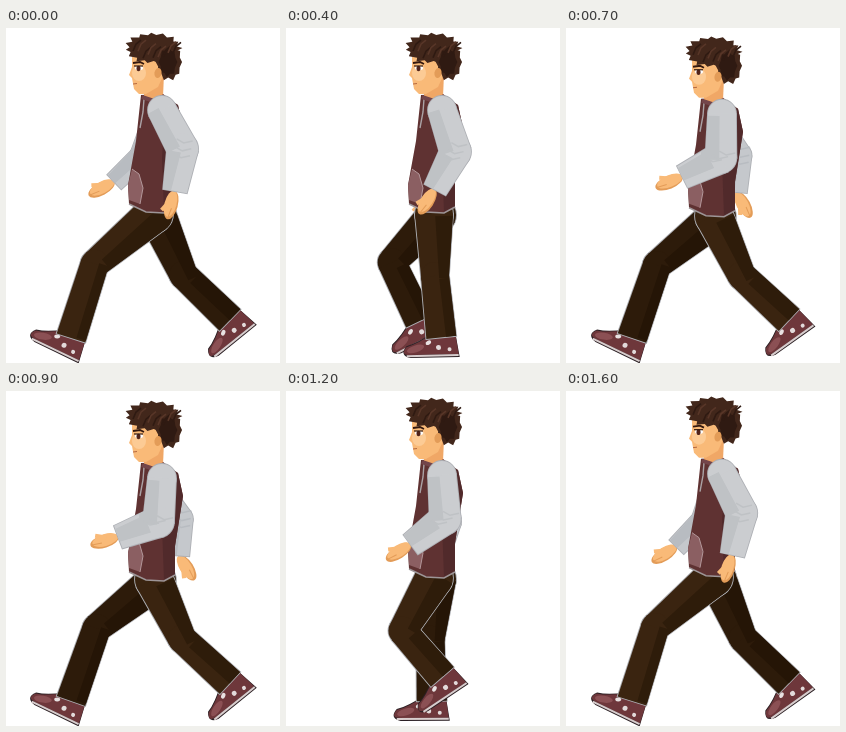
An HTML page with a canvas that plays this animation: 274x335 px, repeating every 1.7 s.

```html
<!DOCTYPE html>
<html lang="en">
<head>
<meta charset="utf-8">
<title>Walk cycle</title>
<style>
html, body { margin: 0; width: 100%; height: 100%; overflow: hidden; background: #fff; }
canvas { display: block; }
</style>
</head>
<body>
<canvas id="stage" width="274" height="335"></canvas>
<script>
const ctx = document.getElementById('stage').getContext('2d');
const LOOP = 1700, STEPS = 16, HALF = 8, GROUND = 310;
const EDGE = '#aeb0b5', SKIN = '#f9ba78', SKIN_DARK = '#e39c58', VEST = '#5f3232', VEST_DARK = '#512a2b';
const { sin, cos, PI, max, hypot } = Math;
const mix = (a, b, p) => a + (b - a) * p;

// --- drawing helpers ---
function random(seed) {
  return () => (seed = seed * 16807 % 2147483647) / 2147483647;
}
function trace(pts) {
  ctx.beginPath();
  pts.forEach(p => ctx.lineTo(...p));
}
function fill(color, ...pts) {
  trace(pts);
  ctx.fillStyle = color;
  ctx.fill();
}
function line(color, width, ...pts) {
  trace(pts);
  ctx.strokeStyle = color;
  ctx.lineWidth = width;
  ctx.stroke();
}
function oval(color, x, y, rx, ry, turn = 0) {
  ctx.beginPath();
  ctx.ellipse(x, y, rx, ry, turn, 0, 2 * PI);
  ctx.fillStyle = color;
  ctx.fill();
}
function at(x, y, angle, part) {
  ctx.save();
  ctx.translate(x, y);
  ctx.rotate(angle);
  part();
  ctx.restore();
}
// Oval with an uneven, spiky rim
function tuft(color, x, y, rx, ry, spikes, seed) {
  const rnd = random(seed), pts = [];
  for (let i = 0; i < spikes * 2; i++) {
    const a = i * PI / spikes + rnd() * .12, r = i % 2 ? .87 : 1 + rnd() * .1;
    pts.push([x + rx * r * cos(a), y + ry * r * sin(a)]);
  }
  fill(color, ...pts);
}
function addSegment(path, [ax, ay], [bx, by], ra, rb) {
  const d = hypot(bx - ax, by - ay), nx = (by - ay) / d, ny = (ax - bx) / d;
  path.moveTo(ax + nx * ra, ay + ny * ra);
  path.lineTo(bx + nx * rb, by + ny * rb);
  path.lineTo(bx - nx * rb, by - ny * rb);
  path.lineTo(ax - nx * ra, ay - ny * ra);
  path.closePath();
}
function addBall(path, [x, y], r) {
  path.moveTo(x + r, y);
  path.arc(x, y, r, 0, 2 * PI);
}
// Two tapered segments with round joints and one shaded side
function limb(a, b, c, [ra, rb, rc], color, shade, side) {
  const parts = [0, 1, 2, 3].map(() => new Path2D()), all = new Path2D(), strip = new Path2D();
  addBall(parts[0], a, ra);
  addSegment(parts[1], a, b, ra, rb);
  addBall(parts[2], b, rb);
  addSegment(parts[3], b, c, rb, rc);
  ctx.strokeStyle = EDGE;
  ctx.lineWidth = 1.8;
  parts.forEach(p => { ctx.stroke(p); all.addPath(p); });
  ctx.fillStyle = color;
  parts.forEach(p => ctx.fill(p));
  const shift = ([x, y]) => [x + side * rb, y + 2];
  addSegment(strip, shift(a), shift(b), ra * .6, rb * .6);
  addSegment(strip, shift(b), shift(c), rb * .6, rc * .5);
  ctx.save();
  ctx.clip(all);
  ctx.fillStyle = shade;
  ctx.fill(strip);
  ctx.restore();
}

// --- motion ---
// p runs from 0 to 1 through a stance or a swing; bend pushes the knee forward.
function stance(p) {
  return {
    x: mix(66, 224, p) + 30 * max(0, sin(2 * PI * p)),
    lift: 18 * p ** 6,
    tilt: .45 * (1 - p) ** 12 - .62 * p ** 6,
    bend: mix(22, 13, p) - 14 * sin(PI * p)
  };
}
function swing(p) {
  return {
    x: mix(225, 67, p),
    lift: (1 - p) ** 2 * (18 + 130 * p),
    tilt: mix(-.68, .45, p ** 3),
    bend: mix(13, 22, p) + 20 * sin(PI * p)
  };
}
const reach = step => .5 + .5 * cos(2 * PI * step / STEPS);

const bobs = [[0, 0], [2, 6], [4, 0], [8, 5], [13, 0], [16, 1]];
function bobAt(step) {
  const n = bobs.findIndex(b => b[0] > step), [s0, y0] = bobs[n - 1], [s1, y1] = bobs[n];
  return mix(y0, y1, (step - s0) / (s1 - s0));
}

// --- body parts ---
function shoe() {
  const body = (color, grow) => {
    ctx.beginPath();
    ctx.moveTo(13, -4 - grow);
    ctx.lineTo(16 + grow, 17 + grow * 3);
    ctx.lineTo(-32, 17 + grow * 3);
    ctx.quadraticCurveTo(-43 - grow, 17, -36, 9 - grow);
    ctx.quadraticCurveTo(-24, 6 - grow, -10, -4 - grow);
    ctx.fillStyle = color;
    ctx.fill();
  };
  body('#2b2024', 1);
  body('#6e373b', 0);
  oval('#8b5054', -27, 11, 9, 3.5, -.3);
  line('#d8cdcd', 2, [-36, 18], [16, 18]);
  oval('#e8e2e2', -14, 5, 3, 2, -.5);
  oval('#e2dada', -4, 10, 2.5, 2.5);
  oval('#e2dada', 7, 12, 2, 2);
}

function leg(hip, { x, lift, tilt, bend }, color, shade) {
  const y = GROUND - lift, dx = x - hip[0], dy = y - hip[1], d = hypot(dx, dy);
  const knee = [hip[0] + dx / 2 - bend * dy / d, hip[1] + dy / 2 + bend * dx / d];
  at(x, y, tilt, shoe);
  limb(hip, knee, [x - 1, y], [19, 14, 15], color, shade, .9);
}

function hand(length) {
  oval(SKIN_DARK, 0, length * .5, 6.5, length * .5);
  oval(SKIN, -1, length * .46, 6, length * .46);
  line(SKIN, 4, [-3, length * .4], [-8, length * .75]);
  line(SKIN_DARK, 1, [1, length * .6], [0, length * .95]);
}

// Each angle goes from the backmost to the foremost value, in degrees from straight down.
function arm(shoulder, s, { upper, fore, palm, size, color, shade }) {
  const angle = ([back, front]) => mix(back, front, s) * PI / 180;
  const from = ([x, y], a, n) => [x - n * sin(a), y + n * cos(a)];
  const elbow = from(shoulder, angle(upper), 44), wrist = from(elbow, angle(fore), size[3]);
  at(...wrist, angle(palm), () => hand(29));
  limb(shoulder, elbow, wrist, size, color, shade, -.7);
  // sleeve folds
  for (const k of [-6, 2, 9]) {
    const [x, y] = from(elbow, angle(fore), k);
    line(shade, 1.5, [x - 7, y - 4], [x, y], [x + 9, y - 2]);
  }
}
const nearArm = {
  upper: [-28, 5], fore: [10, 70], palm: [15, 74], size: [14, 15.5, 12, 43],
  color: '#cbcdd0', shade: '#bfc2c5'
};
const farArm = {
  upper: [-36, 20], fore: [4, 46], palm: [-32, 62], size: [11, 11, 10, 37],
  color: '#c5c8cc', shade: '#b8bcc1'
};

function torso() {
  const shape = [[135, 67], [130, 113], [122, 157], [123, 176], [140, 184], [158, 185], [169, 179],
    [169, 150], [177, 100], [172, 77], [157, 66]];
  fill(VEST, ...shape);
  fill(VEST_DARK, [160, 72], [172, 77], [177, 100], [169, 150], [169, 179], [158, 184], [156, 130]);
  fill('#8b5f62', [126, 141], [133, 146], [137, 160], [134, 176], [123, 172], [122, 157]);
  line('#b3979a', 1, [126, 141], [133, 146], [137, 160], [134, 176]);
  line('#aaa2a5', 1.4, [138, 71], [137, 84], [134, 100]);
  line('#9d9597', 1.5, ...shape.slice(3, 7));
}

function head() {
  fill('#f0a766', [138, 52], [158, 46], [157, 69], [148, 72], [138, 68]);
  fill(SKIN, [126, 26], [126, 39], [123, 47], [126, 50], [128, 61], [133, 66], [140, 66], [152, 59], [158, 46], [156, 26]);
  oval('#fccb95', 133, 45, 7, 8);
  line('#b76940', 1, [127, 56], [131, 55.5]);
  line('#33180f', 1.8, [127, 35], [134, 34], [138, 36]);
  oval('#fff', 133, 40, 4, 2.2);
  oval('#512319', 132.5, 40.5, 2, 2.8);
  line('#33180f', 1.2, [128, 38], [137, 38]);
  tuft('#42271b', 147, 20, 27, 15, 15, 7);
  tuft('#42271b', 163, 34, 13, 18, 10, 23);
  tuft('#2f1a12', 162, 34, 9, 14, 8, 41);
  oval(SKIN_DARK, 152, 45, 3.5, 5, .2);
  const rnd = random(99);
  for (let i = 0; i < 9; i++) {
    const x = 127 + i * 5, y = 19 + rnd() * 9;
    line(i % 2 ? '#583628' : '#2f1a12', 1.6, [x, y + 4], [x + 3, y - 3], [x + 8, y - 7]);
  }
  line('#73454a', 4, [136, 69], [148, 73], [158, 68]);
}

function draw(step) {
  const first = step < HALF, p = step % HALF / (HALF - 1), bob = bobAt(step);
  ctx.clearRect(0, 0, 274, 335);
  arm([150, 87 + bob], reach(step), farArm);
  leg([151, 187 + bob / 2], first ? swing(p) : stance(p), '#2d1b0a', '#251506');
  leg([148, 186 + bob / 2], first ? stance(p) : swing(p), '#3a2410', '#2e1c0a');
  at(0, bob, 0, torso);
  at(0, bob, 0, head);
  arm([156, 82 + bob], reach(step - 8.5) ** 1.3, nearArm);
}

const start = performance.now();
function tick(now) {
  const n = Math.floor(max(0, now - start) % LOOP / 100);
  draw(n < HALF ? n : n - 1); // the contact pose is held for two beats
  requestAnimationFrame(tick);
}
tick(start);
</script>
</body>
</html>
```
